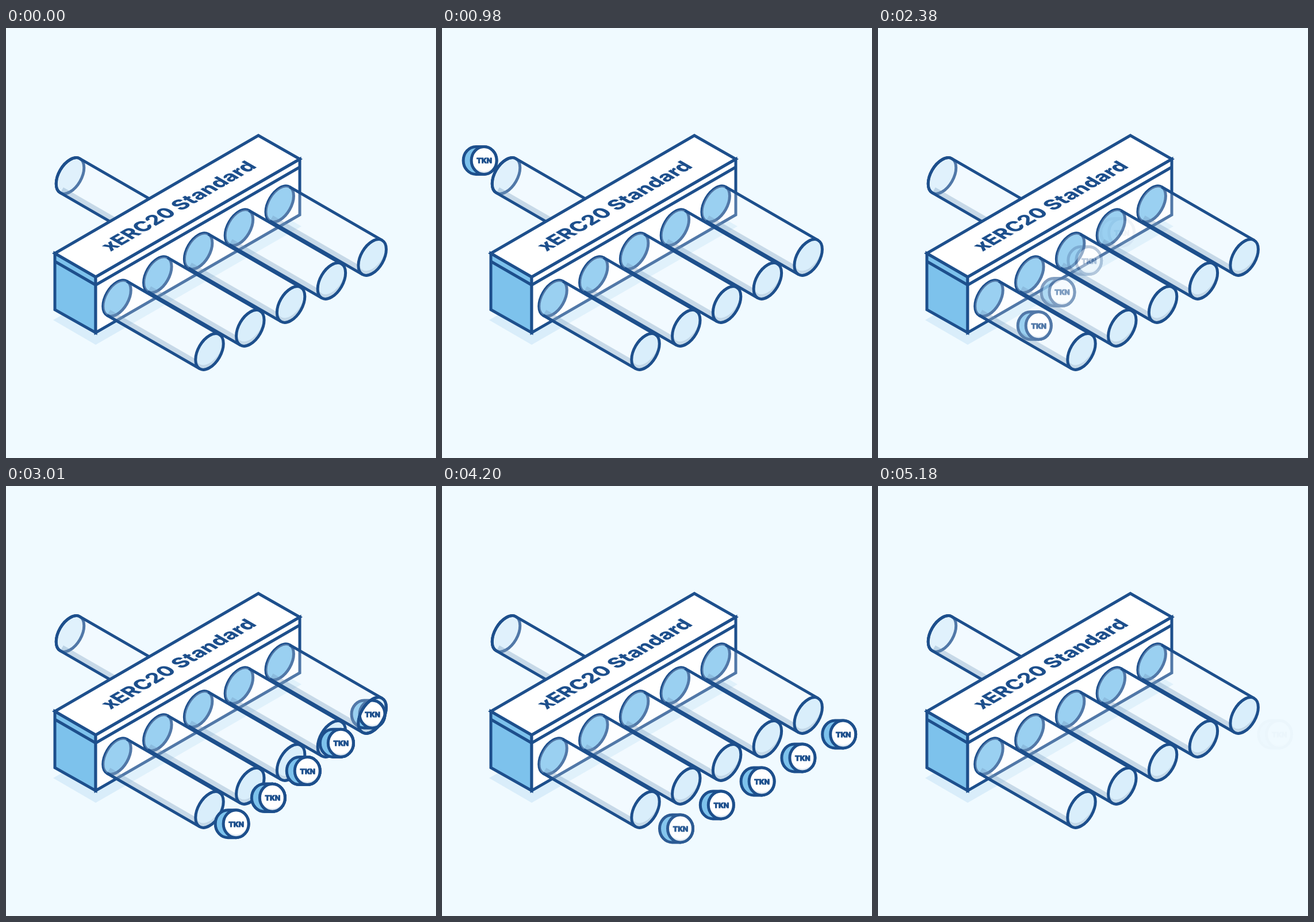
These frames come from a looping animation (748 px wide and 748 px high, 5.25 s). An HTML page with a canvas:

```html
<!DOCTYPE html>
<html lang="en">
<head>
<meta charset="utf-8">
<title>xERC20 Standard</title>
<style>
html, body { margin: 0; width: 100%; height: 100%; overflow: hidden; background: #f0faff; }
canvas { display: block; width: 748px; height: 748px; }
</style>
</head>
<body>
<canvas id="stage" width="748" height="748"></canvas>
<script>
const stage = document.getElementById('stage').getContext('2d');
const layer = document.createElement('canvas').getContext('2d');
layer.canvas.width = layer.canvas.height = 748;
let ctx = stage;

const LOOP = 5250, STEP = 70, STAGGER = 90, TRAVEL = 1380;
const INK = '#1d4f8c', BLUE = '#7dc2ec', PALE = '#d9eefb', BG = '#f0faff';
const SLOPE = Math.tan(Math.PI / 6), TURN = Math.PI * 2;
const MAJOR = 34.3, MINOR = 19.8, TILT = -Math.PI / 3;
const EDGE = { x: 17.15, y: -29.7 };   // tube edge, measured from the axis
const LENGTH = 161;                    // horizontal run of an outlet tube
const INLET = { x: 111.5, y: 257 };
const outlets = [0, 1, 2, 3, 4].map(i => ({ x: 354 + 70.8 * i, y: 563 - 41 * i }));

const clamp = v => Math.max(0, Math.min(1, v));
const ramp = (t, from, to) => clamp((t - from) / (to - from));

// cubic-bezier(.25, .1, .25, 1)
function ease(x) {
  if (x <= 0 || x >= 1) return clamp(x);
  const bez = (p, a, b) => 3 * (1 - p) * (1 - p) * p * a + 3 * (1 - p) * p * p * b + p * p * p;
  let lo = 0, hi = 1;
  for (let i = 0; i < 24; i++) {
    const mid = (lo + hi) / 2;
    if (bez(mid, 0.25, 0.25) < x) lo = mid; else hi = mid;
  }
  return bez(lo, 0.1, 1);
}

function paint(fill, stroke) {
  ctx.lineWidth = 5;
  if (fill) { ctx.fillStyle = fill; ctx.fill(); }
  if (stroke) { ctx.strokeStyle = stroke; ctx.stroke(); }
}

function poly(points, fill, stroke, open) {
  ctx.beginPath();
  points.forEach(([x, y]) => ctx.lineTo(x, y));
  if (!open) ctx.closePath();
  paint(fill, stroke);
}

function oval(x, y, rx, ry, tilt, fill, stroke) {
  ctx.beginPath();
  ctx.ellipse(x, y, rx, ry, tilt, 0, TURN);
  paint(fill, stroke);
}

const rim = (x, y, fill, stroke) => oval(x, y, MAJOR, MINOR, TILT, fill, stroke);

// Tube silhouette: straight edges, round left end, right end open or round.
function tubePath(x, y, run, closed) {
  const ex = x + run, ey = y + run * SLOPE;
  ctx.beginPath();
  ctx.moveTo(ex + EDGE.x, ey + EDGE.y);
  ctx.ellipse(x, y, MAJOR, MINOR, TILT, 0, -Math.PI, true);
  ctx.lineTo(ex - EDGE.x, ey - EDGE.y);
  if (closed) ctx.ellipse(ex, ey, MAJOR, MINOR, TILT, Math.PI, 0, true);
}

function glass(x, y, run) {
  const sx = x - EDGE.x * 0.84, sy = y - EDGE.y * 0.84;
  ctx.save();
  tubePath(x, y, run, true);
  ctx.clip();
  paint('rgba(246,251,255,.24)');
  ctx.lineWidth = 11;
  ctx.strokeStyle = 'rgba(110,145,185,.32)';
  ctx.beginPath();
  ctx.moveTo(sx, sy);
  ctx.lineTo(sx + run, sy + run * SLOPE);
  ctx.stroke();
  ctx.restore();
}

function walls(x, y, run) {
  tubePath(x, y, run, false);
  paint(null, INK);
}

function shaded(x, y, rx, ry, tilt, dy, light, shade) {
  ctx.save();
  oval(x, y, rx, ry, tilt, shade);
  ctx.clip();
  oval(x, y - dy, rx, ry, tilt, light);
  ctx.restore();
  oval(x, y, rx, ry, tilt, null, INK);
}

// x, y is the centre of the lettered face
function coinShape(x, y) {
  const rx = 22, ry = 24, depth = 14;
  ctx.beginPath();
  ctx.ellipse(x - depth, y, rx, ry, 0, Math.PI / 2, Math.PI * 1.5);
  ctx.ellipse(x, y, rx, ry, 0, -Math.PI / 2, Math.PI / 2);
  ctx.closePath();
  paint(BLUE, INK);
  shaded(x, y, rx, ry, 0, 5, '#fff', '#dfe8f1');
  ctx.font = '900 13.5px Roboto, Inter, sans-serif';
  ctx.textAlign = 'center';
  ctx.fillStyle = INK;
  ctx.lineWidth = 0.9;
  ctx.fillText('TKN', x + 0.5, y + 5);
  ctx.strokeText('TKN', x + 0.5, y + 5);
}

// A fading coin goes through a layer so that it fades as one piece.
function coin(x, y, alpha) {
  if (alpha <= 0) return;
  if (alpha >= 1) { coinShape(x, y); return; }
  ctx = layer;
  ctx.clearRect(0, 0, 748, 748);
  coinShape(x, y);
  ctx = stage;
  ctx.globalAlpha = alpha;
  ctx.drawImage(layer.canvas, 0, 0);
  ctx.globalAlpha = 1;
}

function box() {
  poly([[85, 392], [156, 433], [156, 530], [85, 490]], BLUE, INK);
  poly([[156, 433], [511, 228], [511, 325], [156, 530]], '#fff', INK);
  poly([[85, 406], [156, 447], [511, 242]], null, INK, true);
  poly([[85, 392], [439, 187], [511, 228], [156, 433]], '#fff', INK);
  ctx.save();
  ctx.transform(0.866, -0.5, 0.866, 0.5, 299.5, 309.5);
  ctx.font = '800 34px Inter, Roboto, sans-serif';
  ctx.textAlign = 'center';
  ctx.fillStyle = INK;
  ctx.fillText('xERC20 Standard', 0, 12);
  ctx.restore();
}

function inlet(t) {
  const move = 210 * ease((t - 850) / TRAVEL);
  const alpha = t < 2300 ? ramp(t, 600, 850) : 0;
  rim(INLET.x, INLET.y, PALE, INK);
  coin(55 + move, 220 + move * SLOPE, alpha);
  glass(INLET.x, INLET.y, 150);
  walls(INLET.x, INLET.y, 150);
}

function outCoin(end, t) {
  const u = -145.5 + 206 * ease((t - 2075) / TRAVEL);
  const alpha = ramp(t, 2090, 2370) * (1 - ramp(t, 4150, 4830));
  return { u, alpha, x: end.x + u, y: end.y + u * SLOPE - 2 };
}

function outlet(end, c) {
  const x = end.x - LENGTH, y = end.y - LENGTH * SLOPE;
  rim(x, y, BLUE, INK);
  coin(c.x, c.y, c.u < 40 ? c.alpha : 0);
  glass(x, y, LENGTH);
  poly([[end.x + EDGE.x, end.y + EDGE.y], [x + EDGE.x, y + EDGE.y]], null, INK, true);
  poly([[end.x - EDGE.x, end.y - EDGE.y], [x - EDGE.x, y - EDGE.y]], null, INK, true);
  shaded(end.x, end.y, MAJOR, MINOR, TILT, 8, PALE, '#c3d8e8');
}

// The part of a coin seen in or beyond the open end of its tube.
function coinOutside(end, c) {
  if (c.alpha <= 0 || c.u < -50) return;
  const far = 3, ax = EDGE.x * far, ay = EDGE.y * far;
  ctx.save();
  if (c.u < 40) {
    ctx.beginPath();
    ctx.ellipse(end.x, end.y, MAJOR, MINOR, TILT, 0, TURN);
    ctx.moveTo(end.x + ax, end.y + ay);
    ctx.lineTo(end.x + ax + 200, end.y + ay + 115);
    ctx.lineTo(end.x - ax + 200, end.y - ay + 115);
    ctx.lineTo(end.x - ax, end.y - ay);
    ctx.closePath();
    ctx.clip();
  }
  coin(c.x, c.y, c.alpha);
  ctx.restore();
  if (c.u < 8) rim(end.x, end.y, null, INK);
}

function render(t) {
  ctx.fillStyle = BG;
  ctx.fillRect(0, 0, 748, 748);
  poly([[82, 508], [156, 551], [514, 345], [440, 302]], '#d9edfa');
  inlet(t);
  box();
  const coins = outlets.map((end, i) => outCoin(end, t - i * STAGGER));
  for (let i = 4; i >= 0; i--) outlet(outlets[i], coins[i]);
  for (let i = 4; i >= 0; i--) coinOutside(outlets[i], coins[i]);
}

let start = null;
function tick(now) {
  if (start === null) start = now;
  const t = (now - start) % LOOP;
  render(Math.floor(t / STEP) * STEP);
  requestAnimationFrame(tick);
}
render(0);
requestAnimationFrame(tick);
</script>
</body>
</html>
```
